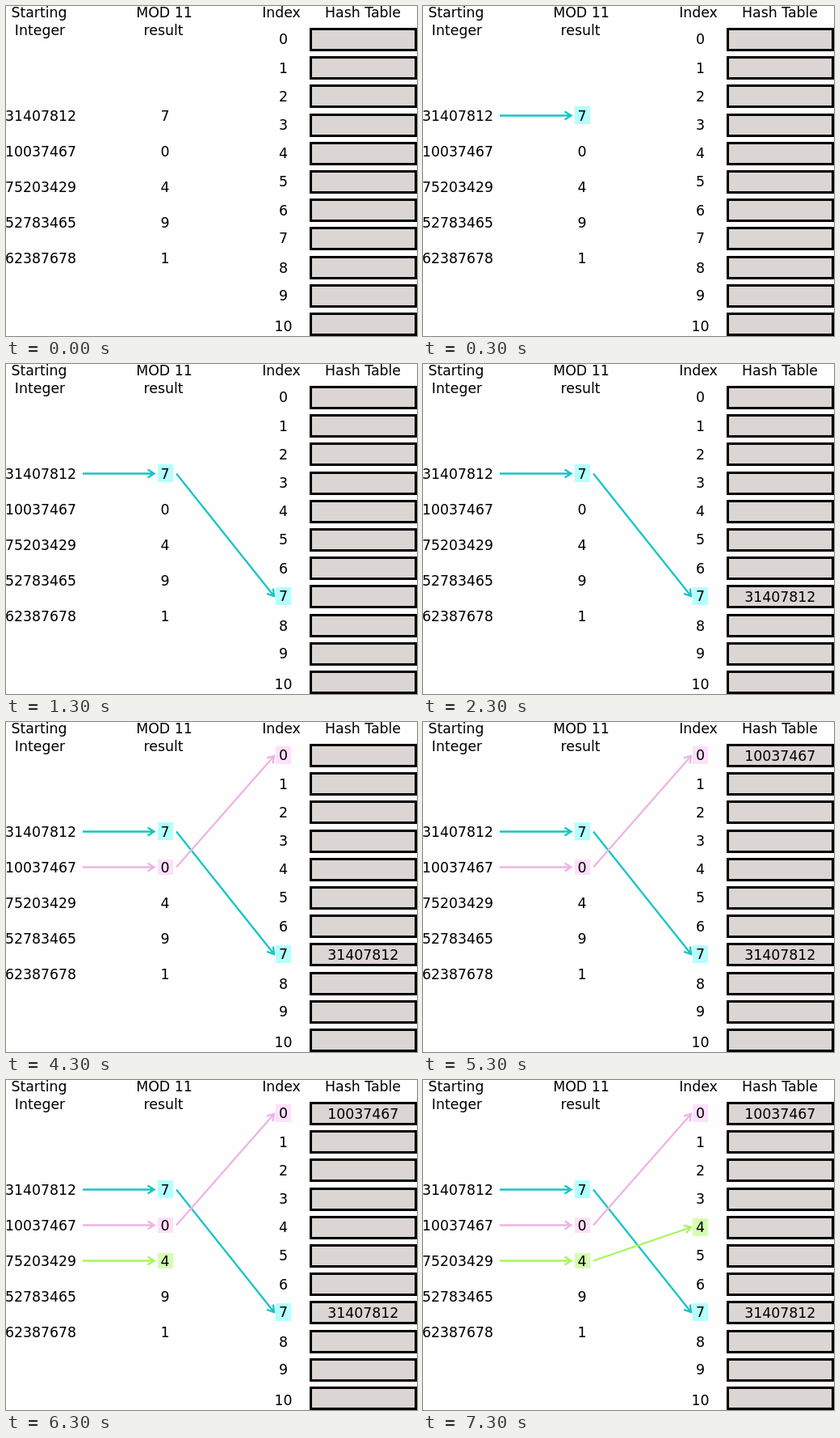
An HTML page for the animation above (8 s loop, 509 by 408 pixels).

```html
<!DOCTYPE html>
<html lang="en">
<head>
<meta charset="utf-8">
<title>Hash table insertion</title>
<style>
html, body { margin: 0; width: 100%; height: 100%; overflow: hidden; background: #fefefe; }
svg { display: block; width: 509px; height: 408px; }
text { font: 17.33px "DejaVu Sans", sans-serif; text-anchor: middle; fill: #000; }
.slot { fill: #dbd5d3; stroke: #000; stroke-width: 3; }
.arrow { fill: none; stroke-width: 2.3; }
.step { opacity: 0; animation: 8s step-end infinite; }
@keyframes s0 { 0% { opacity: 0 } 3.75%, 100% { opacity: 1 } }
@keyframes s1 { 0% { opacity: 0 } 16.25%, 100% { opacity: 1 } }
@keyframes s2 { 0% { opacity: 0 } 28.75%, 100% { opacity: 1 } }
@keyframes s3 { 0% { opacity: 0 } 41.25%, 100% { opacity: 1 } }
@keyframes s4 { 0% { opacity: 0 } 53.75%, 100% { opacity: 1 } }
@keyframes s5 { 0% { opacity: 0 } 66.25%, 100% { opacity: 1 } }
@keyframes s6 { 0% { opacity: 0 } 78.75%, 100% { opacity: 1 } }
@keyframes s7 { 0% { opacity: 0 } 91.25%, 100% { opacity: 1 } }
</style>
</head>
<body>
<svg viewBox="0 0 509 408">
  <g id="slots"></g>
  <g id="steps"></g>
  <g id="labels">
    <text x="41" y="14">Starting</text>
    <text x="42" y="36">Integer</text>
    <text x="196" y="14">MOD 11</text>
    <text x="195" y="36">result</text>
    <text x="341" y="14">Index</text>
    <text x="442" y="14">Hash Table</text>
  </g>
</svg>
<script>
const $ = id => document.getElementById(id);

function add(parent, tag, attrs, content) {
  const el = document.createElementNS('http://www.w3.org/2000/svg', tag);
  for (const k in attrs) el.setAttribute(k, attrs[k]);
  if (content !== undefined) el.textContent = content;
  parent.appendChild(el);
  return el;
}

const label = (parent, x, y, s) => add(parent, 'text', { x, y }, s);
const mark = (parent, x, y, width, height, fill) =>
  add(parent, 'rect', { x, y, width, height, fill });

function arrow(parent, x1, y1, x2, y2, stroke) {
  const len = Math.hypot(x2 - x1, y2 - y1);
  const dx = (x2 - x1) / len, dy = (y2 - y1) / len;
  const barb = side => `${x2 - 8 * dx - side * 5 * dy} ${y2 - 8 * dy + side * 5 * dx}`;
  add(parent, 'path', {
    class: 'arrow', stroke,
    d: `M${x1} ${y1}L${x2} ${y2}M${barb(1)}L${x2} ${y2}L${barb(-1)}`
  });
}

const indexY = [41, 77, 112, 147, 182, 217, 253, 287, 324, 358, 396];
const slotY = i => Math.round(27 + 35.2 * i);
const rowY = i => 135.5 + 44 * i;

indexY.forEach((y, i) => {
  add($('slots'), 'rect', { class: 'slot', x: 377.5, y: slotY(i) + 1.5, width: 130, height: 26 });
  label($('labels'), 343.5, y + 6, i);
});

const keys = ['31407812', '10037467', '75203429', '52783465', '62387678'];
keys.forEach((key, i) => {
  label($('labels'), 43, rowY(i) + 6.5, key);
  label($('labels'), 197, rowY(i) + 6.5, key % 11);
});

let count = 0;
const step = () => add($('steps'), 'g', { class: 'step', style: `animation-name:s${count++}` });

const inserts = [
  { line: '#18c5c6', glow: '#b4ffff', top: 124, height: 22 },
  { line: '#edb4e5', glow: '#fde0fb', top: 170, height: 19 },
  { line: '#a8f655', glow: '#d5ffb0', top: 214, height: 19 }
];
inserts.forEach(({ line, glow, top, height }, i) => {
  const slot = keys[i] % 11, y = rowY(i);
  const hashed = step();
  arrow(hashed, 95, y, 183.5, y, line);
  mark(hashed, 188, top, 19, height, glow);

  const found = step();
  mark(found, 334, indexY[slot] - 11, 19, 22, glow);
  arrow(found, 211, y, 332, indexY[slot] + (slot ? 0 : 1), line);

  if (count < 8) label(step(), 442.3, slotY(slot) + 21, keys[i]);
});
</script>
</body>
</html>
```
